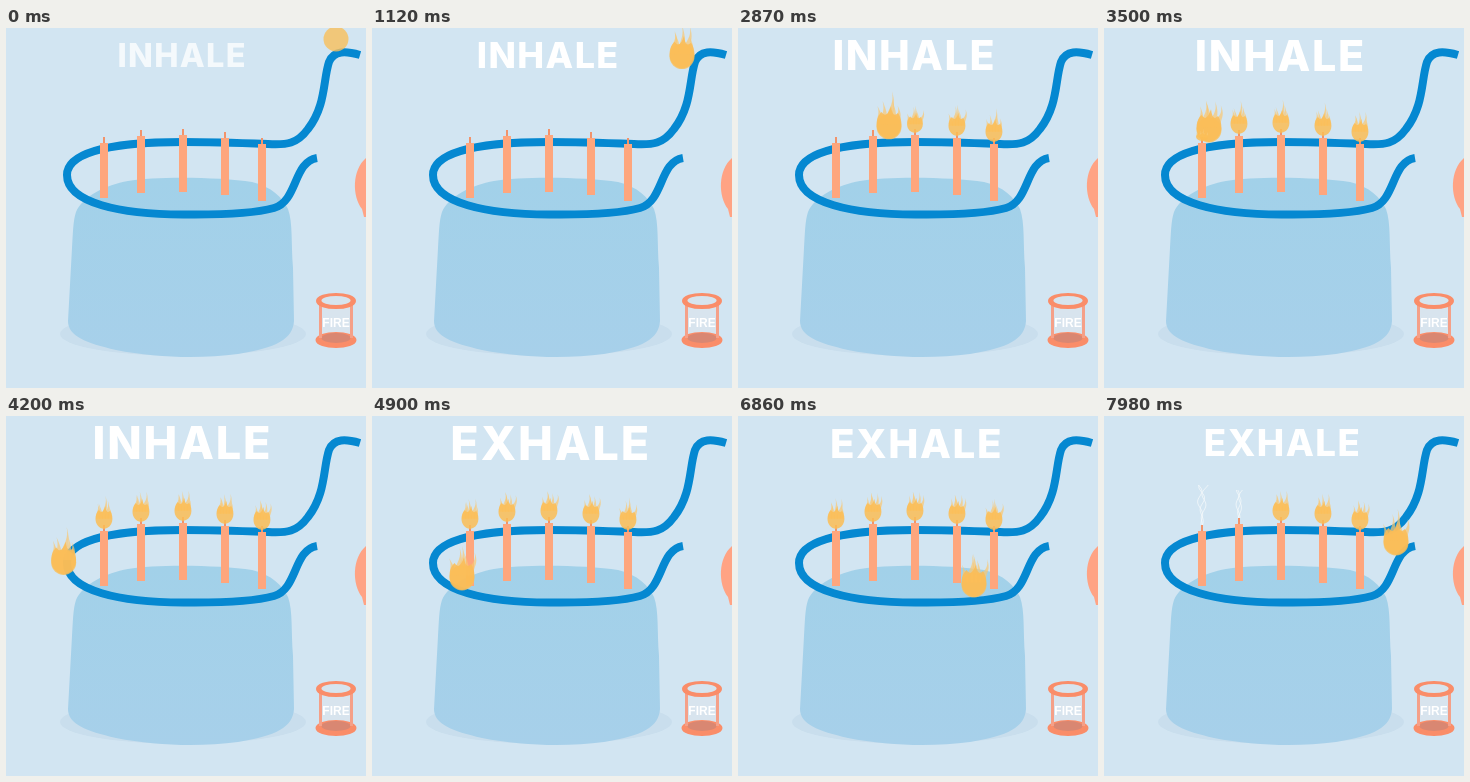
Animation of 360x360 px, one loop 8 s. Source, as an HTML page with a canvas:

```html
<!DOCTYPE html>
<html lang="en">
<head>
<meta charset="utf-8">
<title>Breathing cake</title>
<style>
html, body { margin: 0; width: 100%; height: 100%; overflow: hidden; background: #d2e5f2; }
canvas { display: block; width: 360px; height: 360px; }
</style>
</head>
<body>
<canvas id="stage" width="360" height="360"></canvas>
<script>
const c = document.getElementById('stage').getContext('2d');
const LOOP = 8000, STEP = 70;

const cake = new Path2D('M70 184C77 168 100 157 122 153C150 148 215 149 246 154C266 159 276 169 282 181C287 195 285 215 287 240L288 293C287 311 270 320 232 326C195 331 150 330 110 322C80 315 62 308 62 293L66 220C67 205 67 193 70 184Z');
const rope = new Path2D('M354 27C340 23 328 22 323 34C317 52 320 78 302 101C291 116 281 117 262 116C235 115 205 114 177 114C115 114 61 122 61 147C61 175 115 186.500 177 186.500C218 187 250 185 268 180C292 173 287 134 311 130');
const balloon = new Path2D('M360 130C346 142 346 168 356 181L358 189H360Z');

// x, top, bottom, time lit, time blown out
const candles = [
  [98, 115, 170, 3330, 7250],
  [135, 108, 165, 2960, 7600],
  [177, 107, 164, 2480, 9000],
  [219, 110, 167, 2080, 9000],
  [256, 116, 173, 1780, 9000]
];

// time, x, y of the rolling ball
const route = [
  [0, 330, 11], [500, 323, 12], [900, 314, 19], [1330, 306, 42], [1650, 297, 76],
  [1850, 278, 98], [2000, 252, 101], [2170, 217, 99], [2480, 184, 99], [2960, 144, 99],
  [3500, 105, 102], [3800, 78, 116], [4060, 61, 140], [4250, 58, 148], [4550, 68, 157],
  [4900, 90, 162], [6020, 164, 175], [6860, 236, 169], [7450, 272, 157], [7980, 292, 127]
];

const clamp = v => Math.max(0, Math.min(1, v));

function slope(i, k) {
  const a = route[Math.max(0, i - 1)], b = route[Math.min(route.length - 1, i + 1)];
  return (b[k] - a[k]) / (b[0] - a[0]);
}

// Smooth curve through the timed points
function ballAt(t) {
  let i = 0;
  while (i < route.length - 2 && route[i + 1][0] <= t) i++;
  const a = route[i], b = route[i + 1], d = b[0] - a[0], u = clamp((t - a[0]) / d);
  const at = k => a[k] * (1 + 2 * u) * (1 - u) ** 2 + b[k] * u * u * (3 - 2 * u)
    + d * (slope(i, k) * u * (1 - u) ** 2 + slope(i + 1, k) * u * u * (u - 1));
  return [at(1), at(2)];
}

function oval(x, y, rx, ry, fill, stroke, width) {
  c.beginPath();
  c.ellipse(x, y, rx, ry, 0, 0, 7);
  if (fill) { c.fillStyle = fill; c.fill(); }
  if (stroke) { c.strokeStyle = stroke; c.lineWidth = width; c.stroke(); }
}

// Curved wisp narrowing to a tip
function wisp(x, y, w, h, lean) {
  c.beginPath();
  c.moveTo(x - w, y);
  c.bezierCurveTo(x - w * 1.6, y - h * .4, x + lean + w, y - h * .5, x + lean, y - h);
  c.bezierCurveTo(x + lean + w * 1.6, y - h * .5, x + w * .8, y - h * .4, x + w, y);
  c.fill();
}

// Round body with a row of wisps rising from it
function flame(x, y, w, h, t, alpha = 1) {
  if (alpha <= 0) return;
  c.globalAlpha = alpha * .7;
  c.fillStyle = '#f9c772';
  for (let k = -2; k <= 2; k++) {
    const sway = Math.sin(t / 150 + x * .3 + k * 2.1);
    const rise = h * (.62 - .1 * Math.abs(k) + .07 * sway);
    wisp(x + k * w * .17, y - h * .3, w * .12, rise, w * (.12 * sway + .03 * k));
  }
  c.globalAlpha = alpha * .85;
  c.fillStyle = '#fcbd55';
  c.beginPath();
  c.moveTo(x, y);
  c.bezierCurveTo(x - w * .6, y - h * .05, x - w * .6, y - h * .42, x - w * .3, y - h * .56);
  c.quadraticCurveTo(x - w * .1, y - h * .4, x + w * .08, y - h * .68);
  c.quadraticCurveTo(x + w * .14, y - h * .42, x + w * .36, y - h * .54);
  c.bezierCurveTo(x + w * .6, y - h * .35, x + w * .55, y - h * .05, x, y);
  c.fill();
  c.globalAlpha = 1;
}

function smoke(x, y, age) {
  if (age <= 0) return;
  const h = 40 * clamp(.3 + age / 900);
  c.strokeStyle = '#f3f8fb';
  c.lineWidth = 1;
  c.globalAlpha = .8;
  for (const k of [-1, 0, 1]) {
    c.beginPath();
    for (let s = 0; s <= h; s += 2)
      c.lineTo(x + k * s * .09 + (1 + s * .06) * Math.sin(s * .27 - age / 130 + k * 2), y - s);
    c.stroke();
  }
  c.globalAlpha = 1;
}

function candle([x, top, bottom]) {
  c.fillStyle = '#f2936b';
  c.fillRect(x - 1, top - 6, 2, 7);
  c.fillStyle = '#fea67d';
  c.fillRect(x - 4, top, 8, bottom - top);
}

function jar() {
  c.fillStyle = '#d8e4ee';
  c.fillRect(314, 274, 32, 38);
  oval(330, 312, 19, 6.5, '#fa8d69', '#fa8d69', 3);
  oval(330, 310, 14.5, 5, '#d98772');
  c.fillStyle = '#f5a088';
  c.fillRect(313, 276, 3, 34);
  c.fillRect(344, 276, 3, 34);
  oval(330, 273, 18, 6, '#fa8d69', '#fa8d69', 4);
  oval(330, 272.5, 14.5, 4.5, '#d6e4ee');
  c.fillStyle = '#fff';
  c.font = 'bold 12px "Liberation Sans", sans-serif';
  c.letterSpacing = '0px';
  c.fillText('FIRE', 330, 299);
}

function title(word, x, size, alpha) {
  c.globalAlpha = clamp(alpha);
  c.fillStyle = '#fff';
  c.font = `800 ${size}px Inter, sans-serif`;
  c.letterSpacing = size * .04 + 'px';
  c.fillText(word, x + size * .02, 27 + size * .364);
  c.globalAlpha = 1;
}

function draw(t) {
  c.fillStyle = '#d2e5f2';
  c.fillRect(0, 0, 360, 360);
  c.textAlign = 'center';

  oval(177, 306, 123, 22, '#c9deed');
  const shade = c.createLinearGradient(0, 150, 0, 330);
  shade.addColorStop(0, '#a2d1e9');
  shade.addColorStop(1, '#a7d0ea');
  c.fillStyle = shade;
  c.fill(cake);

  c.strokeStyle = '#0588d1';
  c.lineWidth = 8;
  c.stroke(rope);

  c.fillStyle = '#ffa384';
  c.fill(balloon);
  jar();

  candles.forEach(candle);

  const [x, y] = ballAt(t);
  c.globalAlpha = .8;
  oval(x, y, 12.5, 12.5, '#f9bf5a');
  c.globalAlpha = 1;
  flame(x, y + 12, 25, 48, t, clamp((t - 300) / 500));

  for (const [cx, top, , on, off] of candles) {
    const lit = clamp((t - on) / 450);
    flame(cx, top - 2, 17 * (.5 + lit / 2), 34 * lit, t, t < on ? 0 : clamp((off + 150 - t) / 150));
    smoke(cx, top - 6, t - off);
  }

  const s = t / 1000;
  title('INHALE', 175.5, 32.5 + 3 * s, Math.min(.75 + t / 800, (4400 - t) / 200));
  title('EXHALE', 177.7, 46.6 - 3.24 * (s - 4.9), (t - 4200) / 200);
}

function tick(now) {
  const t = now % LOOP;
  draw(Math.floor(t / STEP) * STEP);
  requestAnimationFrame(tick);
}
requestAnimationFrame(tick);
</script>
</body>
</html>
```
